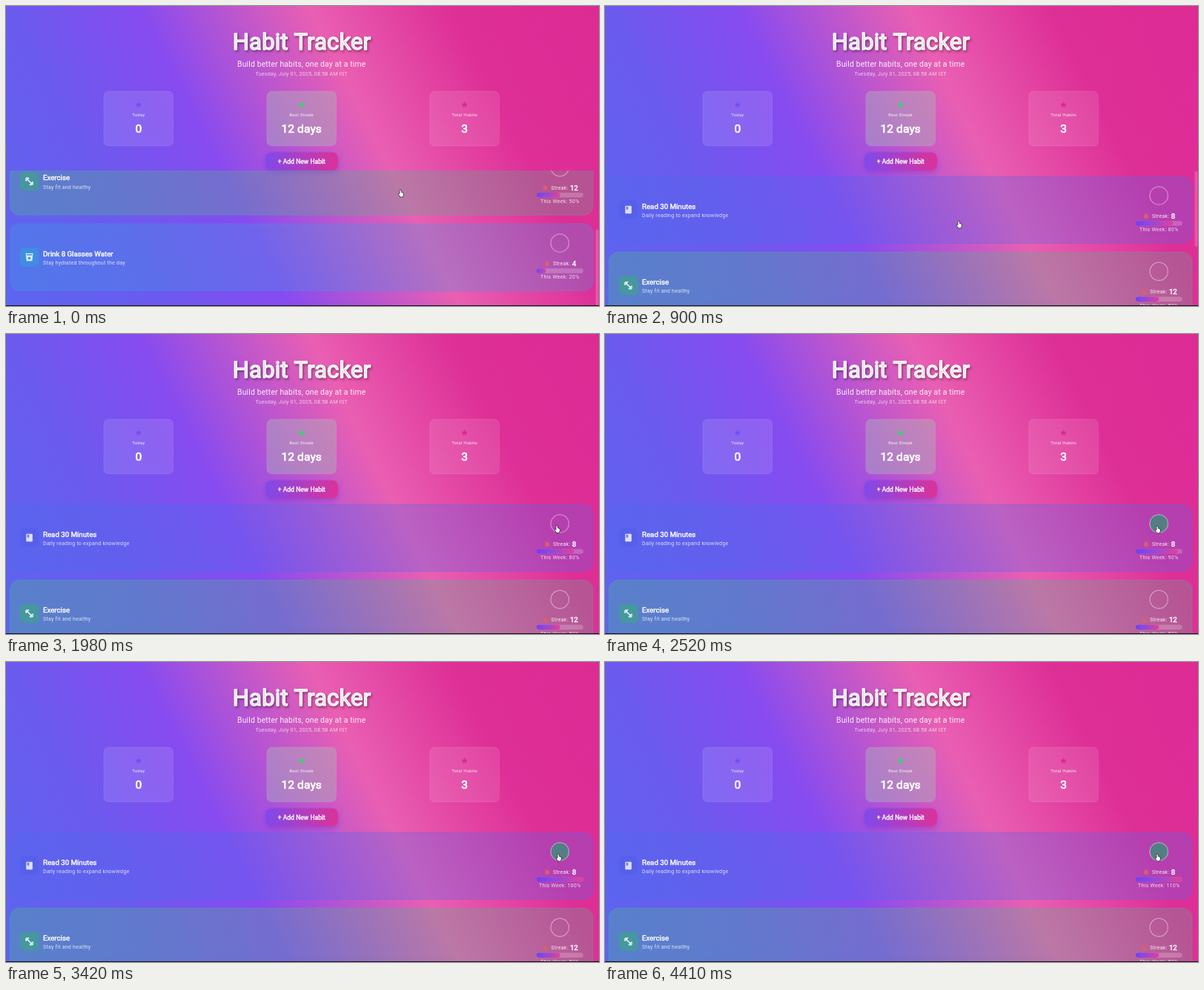
Animation of 800x405 px, one loop 4500 ms. Source, as an HTML page with a canvas:

```html
<!DOCTYPE html>
<html lang="en">
<head>
<meta charset="utf-8">
<title>Habit Tracker</title>
<style>
  html, body { margin: 0; width: 100%; height: 100%; overflow: hidden; background: #6366f1; }
  canvas { display: block; width: 100vw; height: 100vh; }
</style>
</head>
<body>
<canvas id="stage" width="800" height="405"></canvas>
<script>
const ctx = document.getElementById('stage').getContext('2d');
const W = 800, H = 405, LOOP = 4500, STEP = 90;
const LIST_TOP = 222, PITCH = 102.3, CARD_H = 90.5, MAX_SCROLL = 140.6;
const CLICKS = [2430, 3420, 4320];

const habits = [
  { name: 'Read 30 Minutes', note: 'Daily reading to expand knowledge', streak: 8, week: 80,
    tint: '80,104,236', box: 'rgba(84,92,232,.55)', icon: drawBook },
  { name: 'Exercise', note: 'Stay fit and healthy', streak: 12, week: 50,
    tint: '80,178,140', box: 'rgba(58,166,130,.6)', icon: drawDumbbell },
  { name: 'Drink 8 Glasses Water', note: 'Stay hydrated throughout the day', streak: 4, week: 20,
    tint: '64,150,228', box: 'rgba(50,156,222,.6)', icon: drawCup }
];

const clamp = v => Math.max(0, Math.min(1, v));
const ease = (t, a, b) => { const u = clamp((t - a) / (b - a)); return u * u * (3 - 2 * u); };
const mix = (a, b, u) => a + (b - a) * u;

function gradient(x0, y0, x1, y1, ...stops) {
  const g = ctx.createLinearGradient(x0, y0, x1, y1);
  stops.forEach(([at, color]) => g.addColorStop(at, color));
  return g;
}

function box(x, y, w, h, r, fill, stroke) {
  ctx.beginPath();
  ctx.roundRect(x, y, w, h, r);
  if (fill) { ctx.fillStyle = fill; ctx.fill(); }
  if (stroke) { ctx.strokeStyle = stroke; ctx.lineWidth = 0.7; ctx.stroke(); }
}

function text(str, x, y, size, { align = 'left', bold = false, spacing = 0.2, color = '#fff' } = {}) {
  ctx.font = `${size}px Roboto, sans-serif`;
  ctx.letterSpacing = spacing + 'px';
  ctx.textAlign = align;
  ctx.fillStyle = color;
  ctx.fillText(str, x, y);
  if (bold) {
    ctx.strokeStyle = color;
    ctx.lineWidth = size * 0.045;
    ctx.lineJoin = 'round';
    ctx.strokeText(str, x, y);
  }
}

function shadow(color, blur, dx, dy) {
  ctx.shadowColor = color;
  ctx.shadowBlur = blur;
  ctx.shadowOffsetX = dx;
  ctx.shadowOffsetY = dy;
}

function star(cx, cy, r, color) {
  ctx.beginPath();
  for (let i = 0; i < 10; i++) {
    const a = -Math.PI / 2 + i * Math.PI / 5, d = i % 2 ? r * 0.45 : r;
    ctx.lineTo(cx + d * Math.cos(a), cy + d * Math.sin(a));
  }
  ctx.closePath();
  ctx.fillStyle = color;
  ctx.fill();
}

function drawBackground() {
  ctx.fillStyle = gradient(0, H, W, 0,
    [0, '#5b66ef'], [0.2, '#6a5bee'], [0.38, '#874bf0'],
    [0.61, '#e95fb2'], [0.8, '#de2f97'], [1, '#dd2b94']);
  ctx.fillRect(0, 0, W, H);
}

function drawStat(cx, label, value, fill, color) {
  box(cx - 46.8, 115.3, 93.6, 73.4, 6.5, fill, 'rgba(255,255,255,.16)');
  star(cx, 133.5, 4.6, color);
  text(label, cx, 149.3, 6, { align: 'center', color: 'rgba(255,255,255,.88)' });
  text(value, cx, 171, 15.55, { align: 'center', bold: true, spacing: 0.1 });
}

function drawHeader() {
  ctx.save();
  shadow('rgba(0,0,0,.3)', 3.5, 1.3, 1.6);
  text('Habit Tracker', 399, 59, 31.1, { align: 'center', bold: true, spacing: 0.1 });
  ctx.restore();
  text('Build better habits, one day at a time', 398.7, 81.5, 10.37,
    { align: 'center', spacing: 0.16, color: 'rgba(255,255,255,.9)' });
  text('Tuesday, July 01, 2025, 08:58 AM IST', 398.7, 93.5, 7.13,
    { align: 'center', color: 'rgba(255,255,255,.7)' });

  drawStat(178.8, 'Today', '0', 'rgba(255,255,255,.11)', '#7a4cf0');
  drawStat(398.7, 'Best Streak', '12 days', 'rgba(165,190,180,.4)', '#36d36c');
  drawStat(618.6, 'Total Habits', '3', 'rgba(255,255,255,.1)', '#d82a90');

  ctx.save();
  shadow('rgba(110,50,220,.45)', 9, 0, 3);
  box(350, 197.5, 98, 24.5, 8, gradient(350, 0, 448, 0, [0, '#8049ea'], [1, '#dc3298']));
  ctx.restore();
  text('+ Add New Habit', 398.8, 212.8, 8.42, { align: 'center', bold: true, spacing: 0.1 });
}

function drawBook(x, y) {
  box(x - 4.3, y - 5.2, 8.6, 10.4, 1.2, 'rgba(240,240,255,.88)');
  ctx.fillStyle = '#7176ee';
  ctx.fillRect(x - 2.9, y - 4.2, 2.6, 4);
}

function drawDumbbell(x, y) {
  ctx.save();
  ctx.translate(x, y);
  ctx.rotate(Math.PI / 4);
  ctx.fillStyle = 'rgba(245,255,255,.9)';
  ctx.fillRect(-4, -0.8, 8, 1.6);
  for (const s of [-1, 1]) {
    ctx.fillRect(s * 4 - 0.9, -3.2, 1.8, 6.4);
    ctx.fillRect(s * 5.8 - 0.7, -1.8, 1.4, 3.6);
  }
  ctx.restore();
}

function drawCup(x, y) {
  ctx.beginPath();
  ctx.moveTo(x - 5, y - 5.3);
  ctx.lineTo(x + 5, y - 5.3);
  ctx.lineTo(x + 3.8, y + 5.3);
  ctx.lineTo(x - 3.8, y + 5.3);
  ctx.closePath();
  ctx.fillStyle = 'rgba(240,250,255,.88)';
  ctx.fill();
  ctx.fillStyle = '#4590e0';
  ctx.fillRect(x - 3.6, y - 3.9, 7.2, 1.5);
  ctx.beginPath();
  ctx.arc(x, y + 1.5, 1.8, 0, 7);
  ctx.fill();
}

function drawFlame(x, y) {
  ctx.beginPath();
  ctx.moveTo(x - 0.6, y - 3.6);
  ctx.quadraticCurveTo(x + 3.6, y - 1.5, x + 3, y + 1.2);
  ctx.quadraticCurveTo(x + 1.8, y + 3.5, x, y + 3.3);
  ctx.quadraticCurveTo(x - 3.6, y + 2.8, x - 2.9, y - 0.8);
  ctx.closePath();
  ctx.fillStyle = '#d9606c';
  ctx.fill();
}

function drawHabit(h, y, week, done) {
  const dim = 'rgba(255,255,255,.78)';
  box(5.3, y, 786.7, CARD_H, 13,
    gradient(5, y, 792, y + CARD_H, [0, `rgba(${h.tint},.36)`], [1, `rgba(${h.tint},.28)`]),
    `rgba(${h.tint},.5)`);

  box(19, y + 32.3, 25.5, 25.5, 6, h.box);
  h.icon(31.5, y + 45);
  text(h.name, 50, y + 43.5, 9.7, { bold: true, spacing: 0 });
  text(h.note, 50, y + 54.8, 7.13, { color: dim });

  ctx.beginPath();
  ctx.arc(747.2, y + 26, 12.2, 0, 7);
  if (done) { ctx.fillStyle = '#527f83'; ctx.fill(); }
  ctx.strokeStyle = 'rgba(255,255,255,.38)';
  ctx.lineWidth = 1.3;
  ctx.stroke();

  const left = 747.5 - (37.8 + 5.5 * String(h.streak).length) / 2;
  drawFlame(left + 4.2, y + 53.7);
  text('Streak:', left + 12.2, y + 56, 7.13, { color: 'rgba(255,255,255,.88)' });
  text(String(h.streak), left + 37.8, y + 57, 9.7, { bold: true, spacing: 0 });

  const barY = y + 60.3, fill = 63 * Math.min(1, week / 100);
  box(715.8, barY, 63, 6.5, 3.25, 'rgba(255,255,255,.2)');
  box(715.8, barY, fill, 6.5, 3.25,
    gradient(715.8, 0, 715.8 + fill, 0, [0, '#7440ea'], [0.35, '#8c49df'], [1, '#df4299']));
  text(`This Week: ${week}%`, 747.2, y + 74.4, 7.13, { align: 'center', color: dim });
}

function drawList(t, scroll) {
  const clicks = CLICKS.filter(c => t >= c);
  const pressed = clicks.some(c => t < c + 180);
  ctx.save();
  ctx.beginPath();
  ctx.rect(0, LIST_TOP, W, 404 - LIST_TOP);
  ctx.clip();
  habits.forEach((h, i) => {
    const first = i === 0;
    drawHabit(h, 230 + i * PITCH - scroll, h.week + (first ? clicks.length * 10 : 0), first && pressed);
  });
  const alpha = t < 600 ? 1 - ease(t, 200, 540) : 1 - ease(t, 1350, 1650);
  box(795.5, 223 + 79 * scroll / MAX_SCROLL, 4, 102, 2, `rgba(255,255,255,${0.2 * alpha})`);
  ctx.restore();
}

function drawCursor(t) {
  const a = ease(t, 0, 540), b = ease(t, 1080, 1890), c = ease(t, 1980, 2340);
  const x = mix(533, 478, a) + 266 * b + 2 * c;
  const y = mix(253, 295, a) - 31.5 * b + 0.5 * c;
  ctx.save();
  ctx.translate(x, y);
  ctx.beginPath();
  ctx.moveTo(-1.6, -4.5);
  ctx.lineTo(-0.3, -4.5);
  ctx.lineTo(0, -1.4);
  ctx.lineTo(2.7, -0.6);
  ctx.lineTo(3, 2);
  ctx.lineTo(2, 4.5);
  ctx.lineTo(-1.3, 4.5);
  ctx.lineTo(-3.3, 1);
  ctx.lineTo(-2.8, 0.2);
  ctx.lineTo(-1.6, 1);
  ctx.closePath();
  ctx.lineJoin = 'round';
  ctx.strokeStyle = '#242030';
  ctx.lineWidth = 1.3;
  ctx.stroke();
  ctx.fillStyle = '#fff';
  ctx.fill();
  ctx.restore();
}

function render(now) {
  const t = Math.floor((now % LOOP) / STEP) * STEP;
  drawBackground();
  drawHeader();
  drawList(t, MAX_SCROLL * (1 - ease(t, 540, 900)));
  ctx.fillStyle = '#15101c';
  ctx.fillRect(0, 404, W, 1);
  drawCursor(t);
}

const start = performance.now();
function loop() {
  render(performance.now() - start);
  requestAnimationFrame(loop);
}
loop();
</script>
</body>
</html>
```
